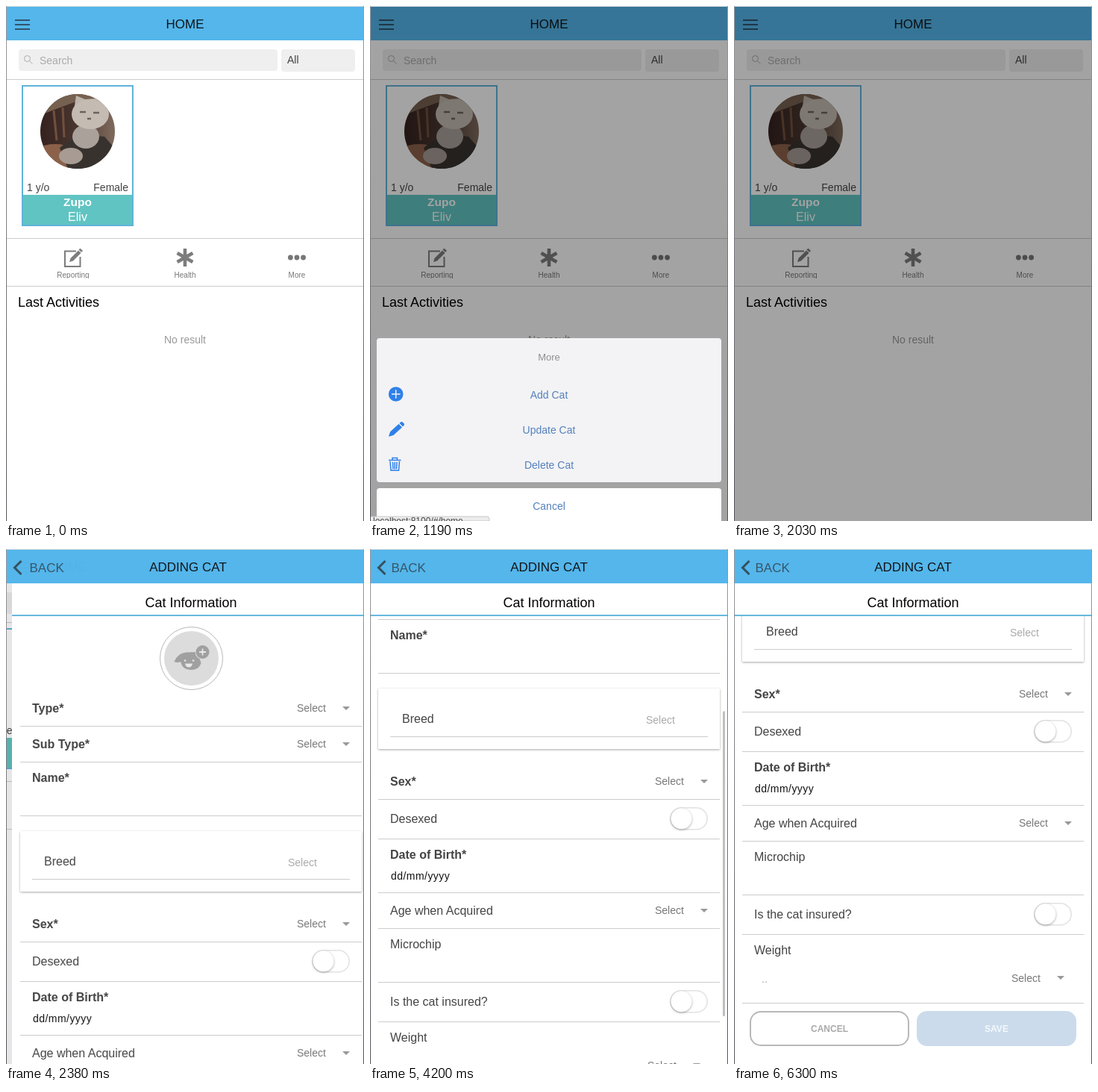
Write an HTML page that moves like this. It is 480 by 690 pixels and loops after 6370 ms.

```html
<!DOCTYPE html>
<html lang="en">
<head>
<meta charset="utf-8">
<title>Adding a cat</title>
<style>
  html, body { margin: 0; width: 100%; height: 100%; overflow: hidden; background: #fff; }
  svg { display: block; width: 480px; height: 690px; }
  text { font: 14px "Liberation Sans", Arial, sans-serif; fill: #444; white-space: pre; }
  .mid { text-anchor: middle; }
  .bar { font-size: 17px; fill: #101418; }
  .big { font-size: 18px; fill: #000; }
  .field { font-size: 16px; }
  .req { font-size: 16px; font-weight: bold; }
  .pick { fill: #777; }
  .pale { fill: #aaa; }
  .tiny { font-size: 10px; fill: #777; }
  .link { fill: #5580bd; }
  .btn { font-size: 12px; font-weight: bold; }
  .rule { stroke: #ccc; fill: none; }
  .icon { fill: none; stroke: #7d7d7d; stroke-width: 2; }
  .blue { fill: #2f80ea; }
  .raised { filter: drop-shadow(0 1px 1.5px rgba(0, 0, 0, .35)); }
</style>
</head>
<body>
<svg viewBox="0 0 480 690">
  <defs>
    <clipPath id="round"><circle cx="96" cy="168" r="50"/></clipPath>
    <clipPath id="tabs"><rect y="312" width="480" height="53"/></clipPath>
    <clipPath id="view"><rect y="90" width="480" height="600"/></clipPath>
    <linearGradient id="edge" x2="0" y2="1">
      <stop stop-color="#9a9a9f"/><stop offset="1" stop-color="#55555c"/>
    </linearGradient>
    <linearGradient id="room">
      <stop stop-color="#35221f"/><stop offset=".5" stop-color="#493630"/><stop offset="1" stop-color="#806b5d"/>
    </linearGradient>
    <path id="caret" d="M0 0h10l-5 5z" fill="#999"/>
    <g id="toggle">
      <rect x=".8" y=".8" width="49.4" height="29" rx="14.5" fill="#fff" stroke="#e2e2e2" stroke-width="1.6"/>
      <circle class="raised" cx="15.5" cy="15.3" r="14" fill="#fff"/>
    </g>
  </defs>

  <rect width="480" height="690" fill="#fff"/>

  <g id="home">
    <rect x="17" y="58" width="347" height="29" rx="4" fill="#efefef"/>
    <g class="icon" style="stroke:#aaa;stroke-width:1"><circle cx="28.5" cy="70.5" r="4"/><path d="M31.5 73.5l4 4"/></g>
    <text class="pale" x="45" y="78">Search</text>
    <rect x="369" y="58" width="99" height="30" rx="4" fill="#efefef"/>
    <text x="377" y="77">All</text>
    <path class="rule" d="M0 98.5h480M0 311.5h480M0 375.5h480"/>

    <rect x="22" y="107" width="148" height="187" fill="#fff" stroke="#60b3da" stroke-width="2"/>
    <g clip-path="url(#round)">
      <rect x="46" y="118" width="100" height="100" fill="url(#room)"/>
      <path d="M46 118h100v14l-52-4-48 18z" fill="#76604f"/>
      <path d="M64 140l4 40M76 136l2 40" stroke="#71503d" stroke-width="3"/>
      <ellipse cx="66" cy="204" rx="34" ry="19" fill="#8c6149"/>
      <path d="M72 190q22-20 60-15l16 18-14 28H84z" fill="#38322f"/>
      <ellipse cx="87" cy="201" rx="16" ry="11" fill="#a79b94"/>
      <ellipse cx="107" cy="175" rx="18" ry="16" fill="#aaa19a"/>
      <path d="M91 140l3-20 12 5 14-1 10-2 4 18z" fill="#bdb4ab"/>
      <ellipse cx="113" cy="145" rx="25" ry="20" fill="#c4bbb2"/>
      <path d="M99 142h8M117 143h8M109 151h5" stroke="#6d625c" stroke-width="2.5"/>
    </g>
    <text x="28" y="248">1 y/o</text>
    <text x="164" y="248" text-anchor="end">Female</text>
    <rect x="23" y="253" width="146" height="40" fill="#60c4c2"/>
    <text class="mid req" x="96" y="268" style="font-size:15.5px;fill:#fff">Zupo</text>
    <text class="mid field" x="96" y="288" style="fill:#fff">Eliv</text>

    <g class="icon">
      <path d="M94 328.500H79v20.500h20.500V336"/>
      <path d="M85 343l1.500-5L97 327.500l3.500 3.500L90 341.500z" fill="#7d7d7d" stroke="none"/>
      <path d="M98 326.500l1.500-1.500 3 3-1.500 1.500z" fill="#7d7d7d" stroke-width="1"/>
      <path d="M240 325v24M229.600 331l20.800 12M229.600 343l20.800-12" stroke-width="4.600"/>
    </g>
    <g fill="#777"><circle cx="381.400" cy="337" r="3.400"/><circle cx="390" cy="337" r="3.400"/><circle cx="398.600" cy="337" r="3.400"/></g>
    <g clip-path="url(#tabs)">
      <text class="mid tiny" x="90" y="364">Reporting</text>
      <text class="mid tiny" x="240" y="364">Health</text>
      <text class="mid tiny" x="390" y="364">More</text>
    </g>
    <text class="big" x="16" y="403">Last Activities</text>
    <text class="mid" x="240" y="452" style="fill:#999">No result</text>
  </g>
  <rect id="dim" y="46" width="480" height="644" opacity="0"/>

  <g id="form">
    <rect y="46" width="480" height="644" fill="#fff"/>
    <g clip-path="url(#view)">
      <g id="list">
        <circle cx="240.500" cy="146.500" r="42" fill="#fff" stroke="#b5b5b5"/>
        <circle cx="240.500" cy="146.500" r="36.500" fill="#dcdcdc"/>
        <path d="M217.500 151q4-11 16-12.500l14-.5 4 9 2 6q-3 9-14 9t-13.500-11q-4 2-8.500 0z" fill="#a0a0a0"/>
        <circle cx="255.500" cy="138" r="10" fill="#dcdcdc"/>
        <circle cx="255.500" cy="138" r="9" fill="#a0a0a0"/>
        <path d="M251 138h9M255.500 133.500v9" stroke="#e8e8e8" stroke-width="1.800"/>
        <g fill="#e8e8e8"><circle cx="232" cy="149.500" r="1.300"/><circle cx="243" cy="149.500" r="1.300"/><path d="M232 153.500h10q-1 5-5 5t-5-5z"/></g>

        <path class="rule" d="M11 237.500h458M11 285.500h458M11 357.500h458M11 526.500h458M11 579.500h458M11 651.500h458M11 699.500h458M11 771.500h458M11 824.500h458M11 916.500h458"/>
        <text class="req" x="27" y="219">Type*</text>
        <text class="pick" x="382" y="218">Select</text><use href="#caret" x="443" y="211"/>
        <text class="req" x="27" y="267">Sub Type*</text>
        <text class="pick" x="382" y="266">Select</text><use href="#caret" x="443" y="259"/>
        <text class="req" x="27" y="312">Name*</text>

        <rect class="raised" x="11" y="378" width="458" height="81" rx="1" fill="#fff"/>
        <text class="field" x="43" y="424">Breed</text>
        <text class="pale" x="370" y="425">Select</text>
        <path class="rule" d="M27 442.500h426"/>

        <text class="req" x="27" y="508">Sex*</text>
        <text class="pick" x="382" y="507">Select</text><use href="#caret" x="443" y="500"/>
        <text class="field" x="27" y="558">Desexed</text><use href="#toggle" x="402" y="537"/>
        <text class="req" x="27" y="606">Date of Birth*</text>
        <text x="28" y="634" style="fill:#111;letter-spacing:.45px">dd/mm/yyyy</text>
        <text class="field" x="27" y="681">Age when Acquired</text>
        <text class="pick" x="382" y="680">Select</text><use href="#caret" x="443" y="673"/>
        <text class="field" x="27" y="726">Microchip</text>
        <text class="field" x="27" y="803">Is the cat insured?</text><use href="#toggle" x="402" y="782"/>
        <text class="field" x="27" y="851">Weight</text>
        <text class="pale" x="37" y="889">..</text>
        <text class="pick" x="372" y="888">Select</text><use href="#caret" x="433" y="880"/>

        <rect x="22" y="928" width="212" height="45" rx="14" fill="#fff" stroke="#b8b8b8" stroke-width="2"/>
        <text class="mid btn pale" x="128" y="955">CANCEL</text>
        <rect x="245" y="927" width="214" height="47" rx="14" fill="#cbdbeb"/>
        <text class="mid btn" x="352" y="955" style="fill:#f4f8fc">SAVE</text>
      </g>
      <rect id="thumb" x="473" y="91" width="3" height="409" rx="1.500" opacity="0"/>
    </g>
    <text class="mid big" x="240" y="78">Cat Information</text>
    <rect y="88" width="480" height="2" fill="#67b9dc"/>
  </g>

  <rect y="1" width="480" height="45" fill="#54b6eb"/>
  <path id="menu" d="M12 19h20M12 25h20M12 31h20" stroke="#31566b" stroke-width="2"/>
  <text id="homeTitle" class="mid bar" x="240" y="30">HOME</text>
  <path id="chevron" d="M20.500 16l-9 9 9 9" fill="none" stroke="#34505f" stroke-width="3" opacity="0"/>
  <text id="back" class="bar" x="28.500" y="31" style="fill:#35566a" opacity="0">BACK</text>
  <text id="formTitle" class="mid bar" x="240" y="30" opacity="0">ADDING CAT</text>

  <rect id="shade" y="1" width="480" height="689" opacity="0"/>

  <g id="sheet">
    <rect x="9" y="445" width="462" height="193" rx="4" fill="#f3f3f5"/>
    <text class="mid" x="240" y="475" style="font-size:13px;fill:#8f8f8f">More</text>
    <circle class="blue" cx="34.700" cy="520" r="9.800"/>
    <path d="M29 520h11.500M34.700 514.300v11.500" stroke="#f3f3f5" stroke-width="1.500"/>
    <text class="mid link" x="240" y="526">Add Cat</text>
    <path class="blue" d="M25 577l2-6.500L38.500 560l4.500 4.500L31.500 575zM39.500 559l2-1.800q1.200-.6 2.200.4l2 2q.8 1.200 0 2.200L44 563.500z"/>
    <text class="mid link" x="240" y="573">Update Cat</text>
    <g fill="none" stroke="#2f80ea" stroke-width="1.500">
      <path d="M25 608.500h16.500M30 608v-2.500h6.500v2.500M27 610l1 12.300h10.500l1-12.300M30.500 611l.5 9.500M33.300 611v9.500M36 611l-.5 9.500"/>
    </g>
    <text class="mid link" x="240" y="620">Delete Cat</text>
    <rect x="9" y="646" width="462" height="48" rx="4" fill="#fff"/>
    <text class="mid link" x="240" y="675">Cancel</text>
  </g>

  <g id="status" opacity="0">
    <path d="M0 690v-6h157q3 0 3 3v3z" fill="#ececec" stroke="#bbb" stroke-width=".8"/>
    <text x="4" y="694" style="font-size:12px">localhost:8100/#/home</text>
  </g>

  <rect width="480" height="1" fill="#dedede"/>
  <rect width="1" height="690" fill="url(#edge)"/>
  <rect x="479" width="1" height="690" fill="url(#edge)"/>
</svg>

<script>
const LOOP = 6370, STEP = 70;
const GLIDE = 'cubic-bezier(.36,.66,.04,1)';
const clips = [];

// keys: [ms, value, easing towards the next key]
function track(id, prop, keys, toCss = v => v) {
  const all = [[0, keys[0][1]], ...keys, [LOOP, keys.at(-1)[1]]];
  const frames = all.map(([ms, v, easing = 'linear']) => ({ offset: ms / LOOP, [prop]: toCss(v), easing }));
  const clip = document.getElementById(id).animate(frames, { duration: LOOP, fill: 'both' });
  clip.pause();
  clips.push(clip);
}
const moveX = (id, keys) => track(id, 'transform', keys, v => `translate(${v}px, 0px)`);
const moveY = (id, keys) => track(id, 'transform', keys, v => `translate(0px, ${v}px)`);
const fade = (id, keys) => track(id, 'opacity', keys);

// Action sheet
fade('status', [[350, 0], [420, 1], [1540, 1], [1680, 0]]);
fade('shade', [[600, 0, 'ease-in-out'], [750, .36], [2040, .36, 'ease-in-out'], [2190, 0]]);
moveY('sheet', [[600, 260, GLIDE], [1100, 0], [1500, 0, GLIDE], [2000, 260]]);

// Page change
const IN = 2035, OUT = 2535;
const slide = (id, from, to) => moveX(id, [[IN, from, GLIDE], [OUT, to]]);
const blend = (id, from, to) => fade(id, [[IN, from, GLIDE], [OUT, to]]);
slide('form', 480, 0);
slide('home', 0, -158);
slide('formTitle', 240, 0);
slide('back', 180, 0);
slide('homeTitle', 0, -160);
blend('dim', 0, .1);
for (const id of ['formTitle', 'back', 'chevron']) blend(id, 0, 1);
for (const id of ['homeTitle', 'menu']) blend(id, 1, 0);

// Form scrolling
const scroll = [
  [3290, 0], [3430, 31.5], [3500, 65, 'ease-out'], [3640, 100],
  [3990, 100], [4200, 191, 'ease-out'], [4270, 205],
  [4900, 205, 'ease-out'], [5180, 308]
];
moveY('list', scroll.map(([ms, y, e]) => [ms, -y, e]));
moveY('thumb', scroll.map(([ms, y, e]) => [ms, y * .66, e]));
fade('thumb', [
  [3290, 0], [3430, .1], [3500, .25], [3640, .25], [3710, 0],
  [3990, 0], [4060, .25], [4270, .25], [4340, 0],
  [4900, 0], [4970, .25], [5180, .25], [5250, 0]
]);

const start = performance.now();
function draw() {
  const t = (performance.now() - start) % LOOP;
  const shown = Math.floor(t / STEP) * STEP;
  for (const clip of clips) clip.currentTime = shown;
  requestAnimationFrame(draw);
}
draw();
</script>
</body>
</html>
```
